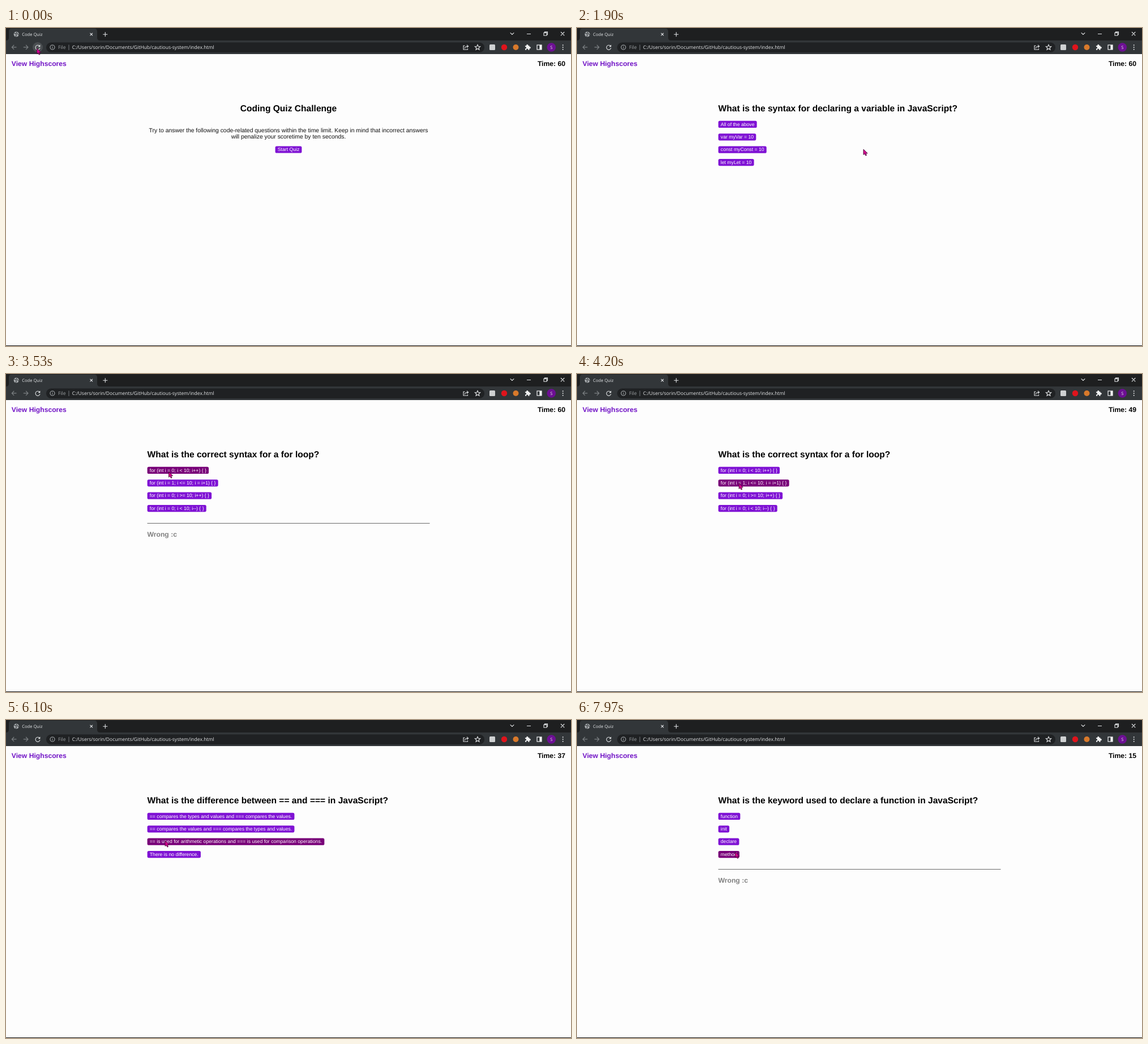
Recreate the animation shown at these times as an HTML page. Size 998x561 px, loop 8000 ms.

```html
<!DOCTYPE html>
<html lang="en">
<head>
<meta charset="utf-8">
<title>Code Quiz</title>
<style>
  html, body { margin: 0; width: 100%; height: 100%; overflow: hidden; background: #fdfdfd; }
  svg { display: block; width: 100%; height: 100%; }
  text { text-rendering: geometricPrecision; white-space: pre; }
  .ui { font-family: "Open Sans", "Noto Sans", sans-serif; fill: #e4e6e8; }
  .page { font-family: "Liberation Sans", Arial, sans-serif; }
  .h1 { font-size: 15.59px; font-weight: bold; fill: #000; }
  .h3 { font-size: 12.16px; font-weight: bold; }
  .body { font-size: 10.4px; fill: #111; }
  .btn { font-size: 8.66px; fill: #fff; }
  .line { fill: none; stroke: #e4e6e8; stroke-width: 1.1; }
  .dim { stroke: #7e8285; }
</style>
</head>
<body>
<svg id="stage" viewBox="0 0 998 561" preserveAspectRatio="none">
  <rect width="998" height="561" fill="#fdfdfd"/>
  <rect y="560" width="998" height="1" fill="#111"/>

  <g id="browser">
    <rect width="998" height="46" fill="#1e1f20"/>
    <path d="M0 22Q5 22 5 17V6Q5 1 10 1H156Q161 1 161 6V17Q161 22 166 22H998V46H0Z" fill="#323639"/>
    <rect x="71" y="25.5" width="774" height="17.5" rx="8.75" fill="#1f2123"/>

    <circle cx="18.2" cy="11" r="4.6" fill="#a5a9ac"/>
    <path d="M14.4 9.5Q17 9 18 11T17 15M19 7Q18 9.3 20 10T22 12.5" fill="none" stroke="#323639" stroke-width="1.2"/>
    <text class="ui" x="28.2" y="13.6" font-size="7.6">Code Quiz</text>
    <path class="line" d="M148.5 8.8L153 13.3M153 8.8L148.5 13.3M171.3 11.2H179.3M175.3 7.2V15.2"/>
    <path class="line" stroke-width=".9" d="M890.7 8.3L894 11.5L897.3 8.3M920 10.5H927M980 7L986.3 13.3M986.3 7L980 13.3M950 8.4H955V13.2H950ZM951.5 8.2V6.9H956.5V11.7H955.2"/>

    <path class="line dim" d="M18.5 33.9H10.3M14.2 30L10.3 33.9L14.2 37.8M30.8 33.9H39M35.1 30L39 33.9L35.1 37.8"/>
    <circle id="reloadHover" cx="56" cy="34" r="9" fill="#4b4f52"/>
    <path class="line" stroke-width="1.3" d="M59.3 31.9A4 4 0 1 0 60 35.2"/>
    <path d="M60.4 29.4V33.3H56.5Z" fill="#e4e6e8"/>

    <circle class="line" cx="82" cy="34" r="4" style="stroke:#a9adb0"/>
    <path d="M82 33.4V36.2M82 31.6V32.6" stroke="#a9adb0"/>
    <text class="ui" x="92" y="37.1" font-size="8.6" style="fill:#9da1a4">File</text>
    <path d="M111 29.5V39" stroke="#777b7e"/>
    <text class="ui" x="116.8" y="37.1" font-size="8.57">C:/Users/sorin/Documents/GitHub/cautious-system/index.html</text>

    <path class="line" stroke-width=".9" d="M810.5 31.3H808V38H815.5V36.2M810.3 36Q810.8 32.2 816.3 32.2M814 29.8L816.6 32.2L814 34.6"/>
    <path id="star" class="line" stroke-width=".9"/>
    <rect x="854" y="29" width="10" height="10" rx="1.5" fill="#cfd1d2"/>
    <circle cx="880" cy="34" r="5.2" fill="#e0141c"/>
    <circle cx="900.5" cy="34" r="5" fill="#d9792b"/>
    <path d="M917 31.2H919.2A1.7 1.7 0 1 1 922.4 31.2H924.5V33.1A1.7 1.7 0 1 1 924.5 36.3V38.7H922.2A1.6 1.6 0 1 0 919.2 38.7H917V36.3A1.6 1.6 0 1 0 917 33.2Z" fill="#f1f2f3"/>
    <rect x="938" y="30" width="8" height="8" fill="none" stroke="#f1f2f3" stroke-width="1.2"/>
    <rect x="942.4" y="30" width="3.8" height="8" fill="#f1f2f3"/>
    <circle cx="963.3" cy="34" r="7.8" fill="#6d0f94"/>
    <text class="ui" x="963.3" y="36.8" font-size="7.6" text-anchor="middle">S</text>
    <g fill="#e4e6e8">
      <circle cx="983.7" cy="30.3" r="1"/><circle cx="983.7" cy="34" r="1"/><circle cx="983.7" cy="37.7" r="1"/>
    </g>
  </g>

  <g class="page" id="page">
    <text class="h3" x="9.8" y="67" fill="#7113c6">View Highscores</text>
    <text class="h3" id="time" x="988" y="67" text-anchor="end">Time: 60</text>
    <g id="wrong">
      <path d="M249.5 263.4H748.5" stroke="#666" stroke-width="1"/>
      <text class="h3" x="249.5" y="287.3" fill="#808080">Wrong :c</text>
    </g>
  </g>

  <path id="cursor" d="M0 0V9.6L2.2 7.8L3.9 11.2L5.6 10.4L4 7.2L7.2 7Z" fill="#d4008f" stroke="#3a0830" stroke-width=".8" stroke-linejoin="round"/>
</svg>

<script>
const LOOP = 8000, START = 1870, SECOND = 1000;
const WRONG_CLICKS = [3000, 4500, 6600, 7800];
const FILL = "#7f12d4", HOVER = "#780078";

const QUIZ = [
  { from: START, title: "What is the syntax for declaring a variable in JavaScript?",
    options: ["All of the above", "var myVar = 10", "const myConst = 10", "let myLet = 10"] },
  { from: WRONG_CLICKS[0], title: "What is the correct syntax for a for loop?",
    options: ["for (int i = 0; i < 10; i++) { }", "for (int i = 1; i <= 10; i = i+1) { }",
      "for (int i = 0; i >= 10; i++) { }", "for (int i = 0; i < 10; i--) { }"] },
  { from: WRONG_CLICKS[1], title: "What is the difference between == and === in JavaScript?",
    options: ["== compares the types and values and === compares the values.",
      "== compares the values and === compares the types and values.",
      "== is used for arithmetic operations and === is used for comparison operations.",
      "There is no difference."] },
  { from: WRONG_CLICKS[2], title: "What is the keyword used to declare a function in JavaScript?",
    options: ["function", "init", "declare", "method"] }
];

// Pointer stops: time, x, y
const PATH = [
  [0, 54.5, 36], [130, 54.5, 36], [380, 300, 205], [600, 495, 307], [830, 582, 245],
  [1070, 532, 224], [1450, 508, 214], [1900, 506, 214], [2530, 352, 181], [2850, 290, 172],
  [3530, 287.5, 172.5], [3850, 287, 173], [4250, 286, 194], [4770, 285.5, 195.5],
  [5250, 285, 196], [5750, 281.5, 212], [6100, 281, 213], [6750, 281, 213],
  [7300, 279.5, 233], [8000, 279.5, 233]
];

const $ = id => document.getElementById(id);
const show = (el, on) => el.setAttribute("display", on ? "inline" : "none");

function add(parent, tag, attrs, text) {
  const el = document.createElementNS("http://www.w3.org/2000/svg", tag);
  for (const key in attrs) el.setAttribute(key, attrs[key]);
  if (text) el.textContent = text;
  return parent.appendChild(el);
}

function addButton(parent, label, y, x, centre) {
  const rect = add(parent, "rect", { y, height: 12.2, rx: 2.6, fill: FILL });
  const text = add(parent, "text", { class: "btn", y: y + 8.8 }, label);
  const w = text.getComputedTextLength() + 8.4;
  const left = centre ? x - w / 2 : x;
  rect.setAttribute("x", left);
  rect.setAttribute("width", w);
  text.setAttribute("x", left + 4.2);
  return { rect, left, y, w };
}

function buildIntro() {
  const g = add($("page"), "g", { "text-anchor": "middle" });
  add(g, "text", { class: "h1", x: 499, y: 147 }, "Coding Quiz Challenge");
  add(g, "text", { class: "body", x: 499, y: 183.5 },
    "Try to answer the following code-related questions within the time limit. Keep in mind that incorrect answers");
  add(g, "text", { class: "body", x: 499, y: 195.3 }, "will penalize your scoretime by ten seconds.");
  const b = add(g, "g", { "text-anchor": "start" });
  return { g, from: 0, buttons: [addButton(b, "Start Quiz", 208.4, 499, true)] };
}

function buildQuestion({ from, title, options }) {
  const g = add($("page"), "g", {});
  add(g, "text", { class: "h1", x: 249.5, y: 147 }, title);
  return { g, from, buttons: options.map((o, i) => addButton(g, o, 163.8 + i * 22.4, 249.6)) };
}

const screens = [buildIntro(), ...QUIZ.map(buildQuestion)];

$("star").setAttribute("d", "M" + Array.from({ length: 10 }, (_, i) => {
  const a = i * Math.PI / 5, r = i % 2 ? 2.2 : 4.9;
  return (833 + r * Math.sin(a)).toFixed(2) + " " + (34.3 - r * Math.cos(a)).toFixed(2);
}).join("L") + "Z");

// Monotone cubic through the pointer stops, one axis at a time
function along(t, axis) {
  const slope = i => i < 0 || i >= PATH.length - 1 ? 0 :
    (PATH[i + 1][axis] - PATH[i][axis]) / (PATH[i + 1][0] - PATH[i][0]);
  const tangent = i => {
    const a = slope(i - 1), b = slope(i);
    return a * b > 0 ? 2 * a * b / (a + b) : 0;
  };
  let i = 0;
  while (i < PATH.length - 2 && t >= PATH[i + 1][0]) i++;
  const span = PATH[i + 1][0] - PATH[i][0], u = (t - PATH[i][0]) / span, v = 1 - u;
  return v * v * (1 + 2 * u) * PATH[i][axis] + u * u * (3 - 2 * u) * PATH[i + 1][axis]
    + span * u * v * (v * tangent(i) - u * tangent(i + 1));
}

function timeLeft(t) {
  // The first tick still reads 60; penalties show on the tick after a click
  const ticks = Math.max(0, Math.floor((t - START) / SECOND) - 1);
  if (!ticks) return 60;
  const last = START + (ticks + 1) * SECOND;
  return 60 - ticks - 10 * WRONG_CLICKS.filter(c => c < last).length;
}

function render(t) {
  const x = along(t, 1), y = along(t, 2);
  const current = screens.filter(s => t >= s.from).pop();
  for (const s of screens) show(s.g, s === current);
  for (const b of current.buttons) {
    const over = x >= b.left && x <= b.left + b.w && y >= b.y && y <= b.y + 12.2;
    b.rect.setAttribute("fill", over ? HOVER : FILL);
  }
  show($("wrong"), WRONG_CLICKS.some(c => t >= c && t < c + SECOND));
  show($("reloadHover"), Math.hypot(x - 56, y - 34) < 9);
  $("time").textContent = "Time: " + timeLeft(t);
  $("cursor").setAttribute("transform", `translate(${x.toFixed(2)} ${y.toFixed(2)})`);
}

const begin = performance.now();
function frame() {
  render((performance.now() - begin) % LOOP);
  requestAnimationFrame(frame);
}
frame();
</script>
</body>
</html>
```
